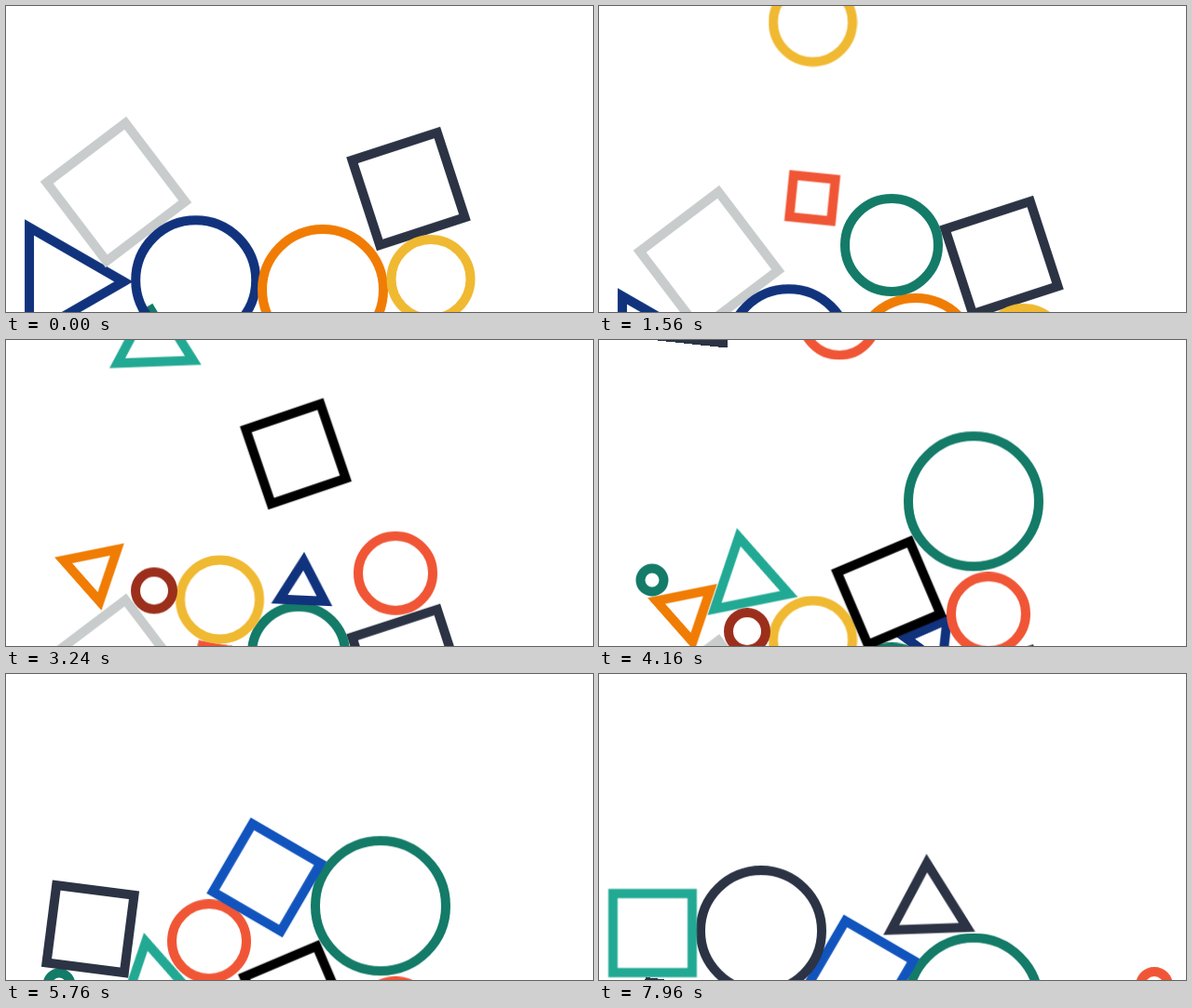
Animation, 630 px wide and 329 px high, one loop 8000 ms. Source, as an HTML page without scripts:

```html
<!DOCTYPE html>
<html lang="en">
<head>
<meta charset="utf-8">
<title>Falling shapes</title>
<style>
html, body { margin: 0; width: 100%; height: 100%; overflow: hidden; background: #fff; }
svg { display: block; width: 100%; height: 100%; }

.world { animation: scroll 8s linear infinite; }
@keyframes scroll { from { transform: translateY(0); } to { transform: translateY(379.5px); } }

/* Each shape rests at its group's origin, turned by --r; the easing is free fall. */
.world g > * {
  fill: none;
  stroke-width: 10;
  transform: rotate(var(--r, 0deg));
  animation: 8s cubic-bezier(.33, 0, .67, .33) infinite;
}
.gray { stroke: #c9cccc; }
.dark { stroke: #2b3344; }
.navy { stroke: #11337d; }
.blue { stroke: #1154bd; }
.green { stroke: #137b67; }
.teal { stroke: #22a994; }
.orange { stroke: #f07c04; }
.yellow { stroke: #f0b932; }
.red { stroke: #f05636; }
.brick { stroke: #9b2f1b; }
.black { stroke: #000; }

@keyframes greenRing { 0%, 2% { transform: translateY(-248px); } 9.5% { transform: none; } }
@keyframes redBox {
  0%, 12.5% { transform: translateY(-292px) rotate(-8deg); }
  20.5% { transform: rotate(var(--r)); }
}
@keyframes yellowRing { 0%, 16.2% { transform: translateY(-238px); } 23% { transform: none; } }
@keyframes navyTri {
  0%, 19.5% { transform: translate(-38.7px, -240px) rotate(-6deg); }
  26.3%, 41% { transform: translate(-38.7px, -14px) rotate(2.6deg); }
  43.5% { transform: rotate(var(--r)); }
}
@keyframes orangeTri {
  0%, 29% { transform: translateY(-252px) rotate(36deg); }
  36.3% { transform: rotate(var(--r)); }
}
@keyframes redRing { 0%, 30.5% { transform: translateY(-260px); } 38% { transform: none; } }
@keyframes brickRing { 0%, 33% { transform: translateY(-268px); } 40.5% { transform: none; } }
@keyframes blackBox {
  0%, 35% { transform: translateY(-277px) rotate(-12deg); }
  42% { transform: rotate(var(--r)); }
}
@keyframes tealTri {
  0%, 37.5% { transform: translateY(-263px) rotate(0deg); }
  44.5% { transform: rotate(var(--r)); }
}
@keyframes greenDot { 0%, 40.5% { transform: translateY(-235px); } 47% { transform: none; } }
@keyframes bigRing { 0%, 41.5% { transform: translateY(-212px); } 48% { transform: none; } }
@keyframes darkBox {
  0%, 49% { transform: translate(6px, -276px) rotate(6deg); }
  57.5% { transform: rotate(var(--r)); }
}
@keyframes rollRing {
  0%, 49% { transform: translate(40px, -271px); }
  57% { transform: translate(40px, -16px); animation-timing-function: ease-in-out; }
  61% { transform: none; }
}
@keyframes blueBox {
  0%, 62% { transform: translateY(-250px) rotate(20deg); }
  68.5% { transform: rotate(var(--r)); }
}
@keyframes darkRing { 0%, 73% { transform: translateY(-248px); } 80% { transform: none; } }
@keyframes grayBox {
  0%, 77% { transform: translate(-24px, -217px) rotate(4deg); }
  83% { transform: translate(-22px, -12px) rotate(10deg); animation-timing-function: ease-in; }
  86% { transform: rotate(25.5deg); animation-timing-function: linear; }
  90% { transform: translate(45px, 40px) rotate(60deg); animation-timing-function: linear; }
  95% { transform: translate(105px, 140px) rotate(100deg); }
  100% { transform: translate(120px, 170px) rotate(110deg); }
}
@keyframes redDot {
  0%, 79.5% { transform: translate(-4px, -172px); }
  85% { transform: translate(-4px, -8px); animation-timing-function: linear; }
  86% { transform: none; animation-timing-function: linear; }
  90% { transform: translate(55px, 25px); animation-timing-function: linear; }
  94% { transform: translate(125px, 106px); animation-timing-function: ease-out; }
  99.5%, 100% { transform: translate(127.5px, 114.4px); }
}
@keyframes tealBox { 0%, 87% { transform: translateY(-283px) rotate(5deg); } 94% { transform: rotate(0deg); } }
@keyframes darkTri {
  0%, 88.5% { transform: translateY(-270px) rotate(8deg); }
  95.5% { transform: rotate(var(--r)); }
}
</style>
</head>
<body>
<svg viewBox="0 0 630 329">
  <g class="world">
    <!-- settled pile -->
    <g transform="translate(147 361)"><rect class="green" x="-25" y="-25" width="50" height="50" style="--r:-31deg"/></g>
    <g transform="translate(58.8 296.3)"><path class="navy" d="M0-67.5 58.5 33.75H-58.5z" style="--r:90deg"/></g>
    <g transform="translate(118 200)"><rect class="gray" x="-53" y="-53" width="106" height="106" style="--r:-37.2deg"/></g>
    <g transform="translate(203.7 294.7)"><circle class="navy" r="64.5"/></g>
    <g transform="translate(340 305)"><circle class="orange" r="65"/></g>
    <g transform="translate(432 196.5)"><rect class="dark" x="-48" y="-48" width="96" height="96" style="--r:-18deg"/></g>
    <g transform="translate(456 293.5)"><circle class="yellow" r="42.5"/></g>

    <!-- falling shapes, in order of arrival -->
    <g transform="translate(314 183)"><circle class="green" r="50" style="animation-name:greenRing"/></g>
    <g transform="translate(229 200.8)"><rect class="red" x="-22.5" y="-22.5" width="45" height="45" style="--r:10deg;animation-name:redBox"/></g>
    <g transform="translate(229.5 125.3)"><circle class="yellow" r="42.5" style="animation-name:yellowRing"/></g>
    <g transform="translate(357 126)"><path class="navy" d="M0-28 24.2 14H-24.2z" style="--r:36.3deg;animation-name:navyTri"/></g>
    <g transform="translate(93.8 93.9)"><path class="orange" d="M0-34 29.4 17H-29.4z" style="--r:48.6deg;animation-name:orangeTri"/></g>
    <g transform="translate(418 97)"><circle class="red" r="40" style="animation-name:redRing"/></g>
    <g transform="translate(159 115.7)"><circle class="brick" r="20" style="animation-name:brickRing"/></g>
    <g transform="translate(311 74.7)"><rect class="black" x="-42.3" y="-42.3" width="84.6" height="84.6" style="--r:-23deg;animation-name:blackBox"/></g>
    <g transform="translate(159.3 60.7)"><path class="teal" d="M0-47 40.7 23.5H-40.7z" style="--r:-11.4deg;animation-name:tealTri"/></g>
    <g transform="translate(57 60.7)"><circle class="green" r="12.5" style="animation-name:greenDot"/></g>
    <g transform="translate(402 -24)"><circle class="green" r="70" style="animation-name:bigRing"/></g>
    <g transform="translate(90.5 .8)"><rect class="dark" x="-42" y="-42" width="84" height="84" style="--r:7.3deg;animation-name:darkBox"/></g>
    <g transform="translate(218 14)"><circle class="red" r="40" style="animation-name:rollRing"/></g>
    <g transform="translate(279.7 -54.5)"><rect class="blue" x="-42.2" y="-42.2" width="84.4" height="84.4" style="--r:30.2deg;animation-name:blueBox"/></g>
    <g transform="translate(174 -101.5)"><circle class="dark" r="65" style="animation-name:darkRing"/></g>
    <g transform="translate(449 -115.4)"><rect class="gray" x="-22.3" y="-22.3" width="44.6" height="44.6" style="animation-name:grayBox"/></g>
    <g transform="translate(468.5 -157)"><circle class="red" r="15" style="animation-name:redDot"/></g>
    <g transform="translate(57.5 -99.1)"><rect class="teal" x="-42.5" y="-42.5" width="85" height="85" style="animation-name:tealBox"/></g>
    <g transform="translate(353.5 -127.3)"><path class="dark" d="M0-47 40.7 23.5H-40.7z" style="--r:-2deg;animation-name:darkTri"/></g>
  </g>
</svg>
</body>
</html>
```
